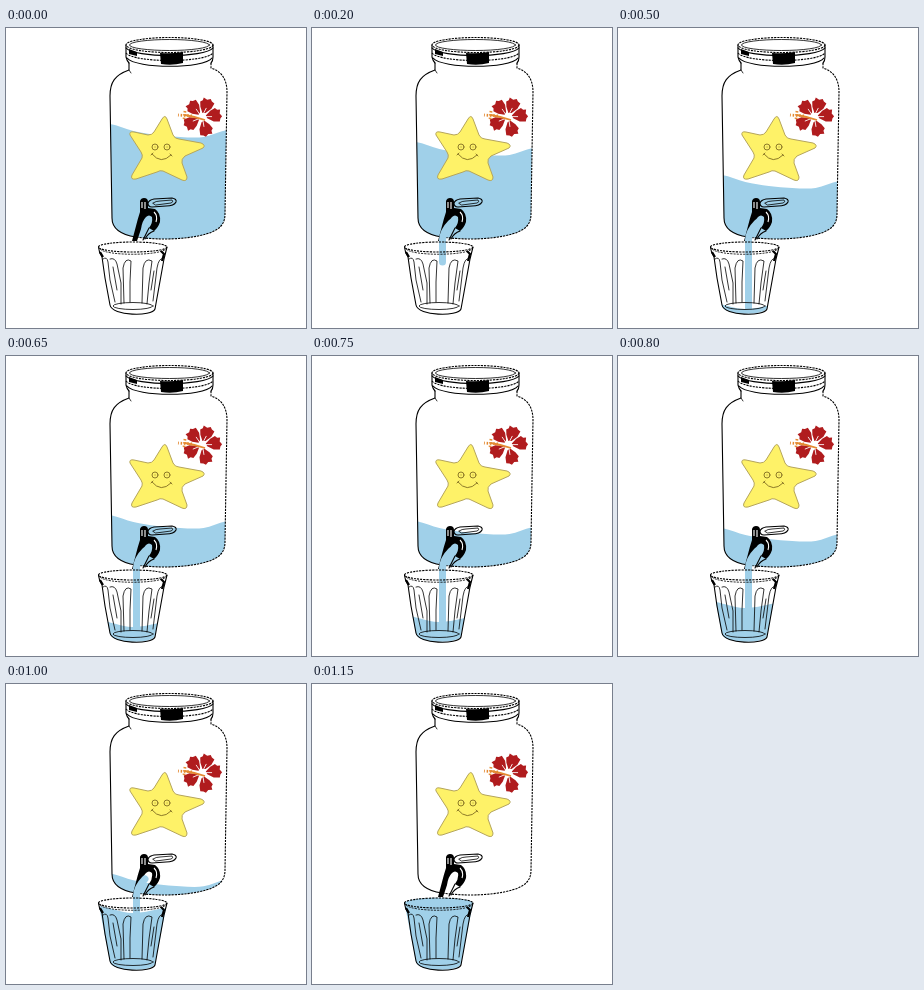
These frames come from a looping animation (300 px wide and 300 px high, 1350 ms). An HTML page:

```html
<!DOCTYPE html>
<html lang="en">
<head>
<meta charset="utf-8">
<title>Drink dispenser</title>
<style>
  html, body { margin: 0; width: 100%; height: 100%; overflow: hidden; background: #fff; }
  svg { display: block; width: 100%; height: 100%; }
  .line { fill: none; stroke: #000; stroke-width: 1.1; stroke-linejoin: round; stroke-linecap: round; }
  .rough { stroke-dasharray: 2.2 1; stroke-linecap: butt; }
  .thin { stroke-width: .8; }
  .water { fill: #a0d0e9; }
  .stream { fill: none; stroke: #a0d0e9; stroke-width: 7; stroke-linecap: round; }
  .face { fill: none; stroke: #8d7a28; stroke-width: 1; stroke-linecap: round; }
  .stamen { fill: none; stroke: #e48a32; }
</style>
</head>
<body>
<svg viewBox="0 0 300 300">
  <defs>
    <clipPath id="jarClip">
      <path d="M123 42C109 47 104 54 104 68L106 190C106 202 117 207 130 209C150 212 180 212 200 206C214 202 219 196 219 186L221 64C221 51 215 43 205 40Z"/>
    </clipPath>
    <clipPath id="cupClip">
      <path d="M92.500 219C94 212 159 212 161 219L149 280C147 288 106 288 104 278Z"/>
    </clipPath>
    <g id="petal">
      <path d="M-1 -4L-5 -9L-7 -14L-5 -16L-5 -19L-1 -18L2 -20L4 -18L7 -17L6 -11L2 -5Z"/>
      <path stroke="#fff" stroke-width=".8" d="M0 -3L1 -10"/>
    </g>
  </defs>

  <path id="jarWater" class="water" clip-path="url(#jarClip)"/>

  <!-- jar -->
  <path class="line" d="M123 35V42C109 47 104 54 104 68L106 190C106 202 117 207 130 209"/>
  <path class="line rough" d="M205 35V40C215 43 221 51 221 64L219 186C219 196 214 202 200 206C180 212 150 212 130 209"/>
  <path class="line thin" d="M123 42L125 45"/>

  <!-- lid -->
  <g class="line">
    <ellipse class="rough" cx="163.500" cy="17" rx="43.500" ry="7.500"/>
    <ellipse class="thin" cx="163.500" cy="17" rx="40" ry="5.500"/>
    <path d="M120 17V29Q121 33 123 35M207 17V29Q207 33 205 35"/>
    <path d="M120 20C128 30 199 30 207 20"/>
    <path class="rough" d="M120 25C128 35 199 35 207 25"/>
    <path d="M121 30C130 41 198 41 206 30"/>
  </g>
  <path d="M154 25Q166 26 177 24V35Q166 38 155 36ZM123 21L131 24V28L123 26Z"/>

  <!-- starfish -->
  <path fill="#fef268" stroke="#b5a55b" d="M156 91Q159 86 161 91L167 107Q169 111 173 111L195 115Q200 117 197 120L179 128Q175 131 176 135L181 149Q181 154 176 152L157 143Q154 142 151 144L130 151Q124 152 126 147L136 130Q137 127 135 124L124 107Q123 103 128 104L142 107Q146 107 148 104Z"/>
  <g class="face">
    <circle cx="149" cy="119" r="3"/><circle cx="161" cy="119" r="3"/>
    <path d="M149 119h.1M161 119h.1M146 126Q155 137 165 127M145 127l2-2M164 126l2 2"/>
  </g>

  <!-- hibiscus -->
  <g id="flower" fill="#b01c1e" transform="translate(196 89)"></g>
  <path class="stamen" stroke-width="1.800" d="M199 92Q190 89 179 87"/>
  <path class="stamen" stroke-width="2.800" stroke-dasharray="1.5 1.8" d="M186 88L172 87M179 83L178 91"/>

  <!-- tap -->
  <path d="M134 173Q135 170 138 170Q142 170 142 174V180L149 181Q155 185 154 194Q152 200 148 203L143 200Q147 195 146 189Q143 186 140 189Q136 193 135 201L131 213H126L130 198Q132 190 134 184Z"/>
  <path fill="none" stroke="#fff" stroke-width="1.100" d="M136 174V180M139 174V181M148 184Q152 188 150 194"/>
  <path class="line" d="M143 200L137 212M148 203Q142 205 139 211"/>
  <path class="line" d="M142 175Q143 172 148 171L166 170Q171 171 170 174Q168 178 160 178L146 179Q142 179 142 175Z"/>
  <path class="line thin" d="M147 175Q150 173 154 173L166 172Q168 174 165 175L150 177Z"/>

  <path id="stream" class="stream"/>
  <path id="cupWater" class="water" clip-path="url(#cupClip)"/>

  <!-- glass -->
  <g class="line">
    <ellipse class="rough" cx="126.700" cy="219" rx="34.200" ry="5"/>
    <path class="thin rough" d="M94 221C100 228 153 228 160 221"/>
    <path d="M92.500 219Q93 225 96 229L99 250L104 277C106 288 146 289 149 281L158 231L161 219"/>
    <ellipse class="thin" cx="127" cy="278" rx="20" ry="3.500"/>
    <path class="thin" d="M97 231Q101 228 102 234L104 252L109 274M104 231Q109 229 111 236L115 255V276M107 239L111 262M118 275L117 240Q119 229 125 233L124 254V274M136 275L137 240Q139 229 146 233L143 255L141 276M147 273L151 240Q153 229 157 231M148 243L145 262"/>
  </g>
  <path fill="none" stroke="#000" stroke-width="2.200" d="M155 223L158 226L156 233M94 224L97 229"/>
</svg>
<script>
  const LOOP = 1350;
  const STARTS = [0, 100, 200, 250, 350, 400, 500, 600, 650, 750, 800, 900, 1000, 1050, 1150];
  const JAR_WAVE = [-10, -3, 1, 3, 3, -4];
  const CUP_WAVE = [-4, 3, -2];
  const SPOUT = 200, CUP_FLOOR = 280;
  const LAST = STARTS.length - 1;
  // [step, height] pairs, linear in between.
  const JAR_LEVEL = [[0, 106], [2, 124], [4, 138], [6, 157], [9, 175], [11, 189], [LAST, 220]];
  const CUP_LEVEL = [[0, 292], [4, 292], [6, 278], [9, 263], [11, 235], [LAST, 208]];
  const STREAM_TIP = [[0, SPOUT], [2, 234], [4, 263], [6, CUP_FLOOR], [LAST, CUP_FLOOR]];

  const el = id => document.getElementById(id);

  function valueAt(keys, step) {
    const i = Math.max(1, keys.findIndex(([s]) => s >= step));
    const [s0, v0] = keys[i - 1], [s1, v1] = keys[i];
    return v0 + (v1 - v0) * (step - s0) / (s1 - s0);
  }

  // Smooth surface through evenly spaced heights, closed below.
  function liquid(left, right, level, wave, bottom) {
    const gap = (right - left) / (wave.length - 1);
    const y = i => level + wave[Math.min(wave.length - 1, Math.max(0, i))];
    let d = `M${left} ${bottom}V${y(0)}`;
    for (let i = 0; i < wave.length - 1; i++) {
      const x = left + gap * i;
      d += `C${x + gap / 3} ${y(i) + (y(i + 1) - y(i - 1)) / 6} ` +
           `${x + gap * 2 / 3} ${y(i + 1) - (y(i + 2) - y(i)) / 6} ${x + gap} ${y(i + 1)}`;
    }
    return d + `V${bottom}Z`;
  }

  function draw(time) {
    const t = time % LOOP;
    const step = STARTS.filter(s => s <= t).length - 1;
    const tip = valueAt(STREAM_TIP, step);
    const pouring = step > 0 && step < LAST;
    el('jarWater').setAttribute('d', liquid(104, 221, valueAt(JAR_LEVEL, step), JAR_WAVE, 222));
    el('cupWater').setAttribute('d', liquid(92, 161, valueAt(CUP_LEVEL, step), CUP_WAVE, 300));
    el('stream').setAttribute('d', pouring ? `M139 195Q131 203 130.500 212V${tip}` : '');
  }

  el('flower').innerHTML = [-42, 20, 82, 163, 240]
    .map(a => `<use href="#petal" transform="rotate(${a})"/>`).join('');

  const start = performance.now();
  function tick() {
    draw(performance.now() - start);
    requestAnimationFrame(tick);
  }
  tick();
</script>
</body>
</html>
```
